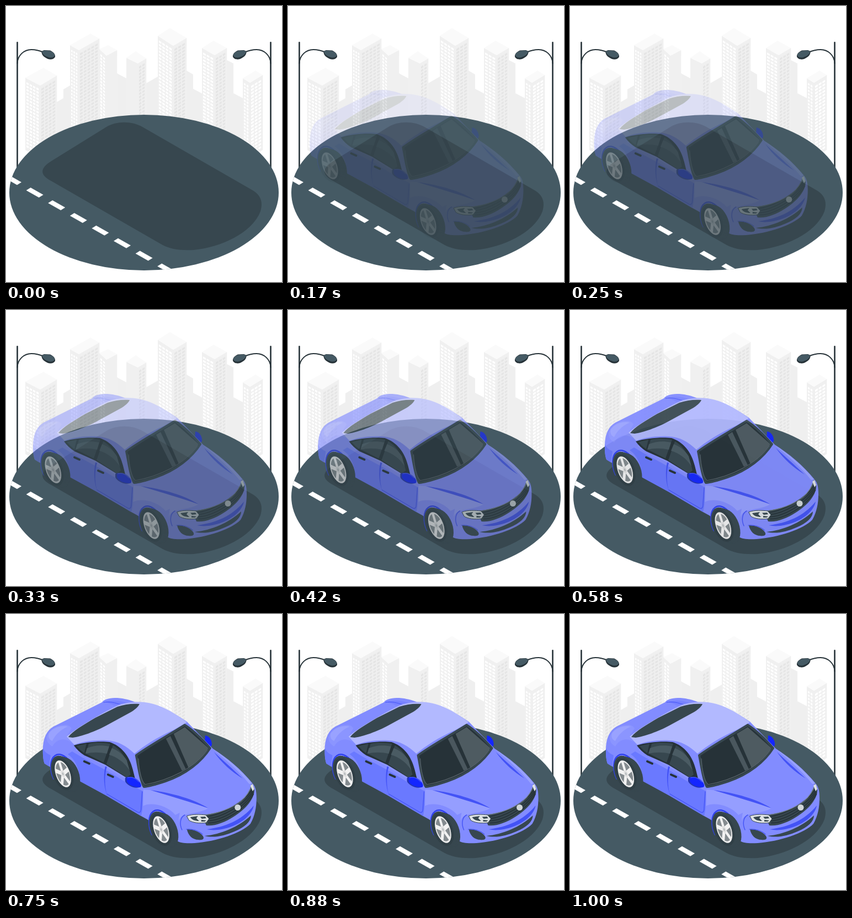
An HTML page with a canvas that plays this animation: 500 by 500 pixels, repeating every 1040 ms.

```html
<!DOCTYPE html>
<html lang="en">
<head>
<meta charset="utf-8">
<title>Car arriving</title>
<style>
html, body { margin: 0; width: 100%; height: 100%; overflow: hidden; background: #fff; }
canvas { display: block; width: 500px; height: 500px; }
</style>
</head>
<body>
<canvas id="stage"></canvas>
<script>
const SIZE = 500, LOOP = 1040, FPS = 24;
const INK = '#263238', SLATE = '#37474f', ROAD = '#455a64';
const BODY = '#828cff', SIDE = '#6a79ff', LIGHT = '#99a2ff', ROOF = '#b2b9ff', SEAM = '#4353f6', BLUE = '#1426ff';
const dpr = window.devicePixelRatio || 1;

function surface(canvas) {
  canvas.width = canvas.height = SIZE * dpr;
  const c = canvas.getContext('2d');
  c.scale(dpr, dpr);
  return c;
}
const stageCanvas = document.getElementById('stage');
const sceneCanvas = document.createElement('canvas');
const carCanvas = document.createElement('canvas');
const stage = surface(stageCanvas), scene = surface(sceneCanvas), car = surface(carCanvas);

function fill(c, d, color) {
  c.fillStyle = color;
  c.fill(new Path2D(d));
}
function line(c, d, color, width) {
  c.strokeStyle = color;
  c.lineWidth = width;
  c.lineCap = c.lineJoin = 'round';
  c.stroke(new Path2D(d));
}

// ---- scenery ----

// One wall of a tower: skewed so that its top edge runs from (x0,y0) to (x1,y1).
function wall(x0, y0, x1, y1, cols, glass) {
  const w = x1 - x0, pitch = cols ? (w - 3) / cols : 0, h = 275 - Math.max(y0, y1);
  scene.save();
  scene.transform(1, (y1 - y0) / w, 0, 1, x0, y0);
  scene.fillStyle = '#f0f0f0';
  scene.fillRect(0, 0, w + 0.3, h);
  scene.fillStyle = glass;
  for (let i = 0; i < cols; i++) {
    for (let y = 7; y < h - 4; y += 6) scene.fillRect(2 + i * pitch, y, pitch - 1.8, 3.6);
  }
  scene.restore();
}

function tower([lx, ly, bx, by, rx, ry, fx, fy], leftCols, rightCols, rightGlass = '#e5e5e5') {
  wall(lx, ly, fx, fy, leftCols, '#fff');
  wall(fx, fy, rx, ry, rightCols, rightGlass);
  fill(scene, `M${lx},${ly}L${bx},${by}L${rx},${ry}L${fx},${fy}Z`, '#fafafa');
}

function lamp() {
  line(scene, 'M20.5,66V294', INK, 2.6);
  line(scene, 'M20.5,104C21,89 33,79 46,79C55,79 61,81 68,84', INK, 2);
  fill(scene, 'M64.5,82L69,80L80,80.5C87,84 89.5,88 89,92C87,97 79,98 74,95C68,92 64,88 64.5,82Z', INK);
  fill(scene, 'M65.5,82L70,80.5L80,81.5C86,84 88.5,87 88,90C86,94 80,94.5 75,92C69,90 65,86 65.5,82Z', ROAD);
}

function drawScene() {
  scene.fillStyle = '#fff';
  scene.fillRect(0, 0, SIZE, SIZE);
  fill(scene, 'M92,174L104,167V151L116,144V270H92ZM201,122L218,131V230H201ZM254,140L275,128V230H254Z'
    + 'M327,117L339,124V150L356,159V240H327ZM400,98L412,104V158L429,167V270H400Z', '#efefef');
  tower([169, 78, 185, 71, 201, 80, 182, 90], 2, 0);
  tower([35, 130, 68, 112, 92, 126, 62, 144], 4, 4);
  tower([116, 71, 153, 50, 169, 59, 132, 80], 3, 5);
  tower([218, 94, 235, 82, 254, 95, 239, 104], 0, 2);
  tower([275, 54, 297, 40, 327, 58, 303, 72], 4, 3);
  tower([355, 76, 376, 63, 400, 76, 378, 89], 3, 3);
  tower([429, 131, 452, 117, 465, 125, 442, 139], 2, 3, '#fff');
  lamp();
  scene.save();
  scene.translate(SIZE, 0);
  scene.scale(-1, 1);
  lamp();
  scene.restore();

  // road disc, dashes and shadow
  scene.save();
  scene.beginPath();
  scene.ellipse(250, 338, 244, 141, 0, 0, 7);
  scene.fillStyle = ROAD;
  scene.fill();
  scene.clip();
  for (let i = 0; i < 8; i++) {
    const x = 5 + 39.6 * i, y = 306.2 + 22.9 * i;
    fill(scene, `M${x},${y}l23,13l-8,5l-23,-13Z`, '#fff');
  }
  scene.restore();
  fill(scene, 'M182,219C200,208 228,208 247,219L447,334C462,343 466,356 461,372C446,411 390,437 340,442'
    + 'C315,443 298,441 282,432L82,317C61,306 61,294 82,281Z', SLATE);
}

// ---- car ----

function disc(c, r, color) {
  c.beginPath();
  c.arc(0, 0, r, 0, 7);
  c.fillStyle = color;
  c.fill();
}

function wheel(x, y) {
  const tilt = -20 * Math.PI / 180;
  car.beginPath();
  car.ellipse(x + 1, y - 0.5, 20, 34, tilt, Math.PI * 0.95, Math.PI * 1.85);
  car.strokeStyle = '#2f41f0';
  car.lineWidth = 2.6;
  car.stroke();
  car.fillStyle = SLATE;
  for (let k = 11; k >= 0; k--) {
    car.beginPath();
    car.ellipse(x + k, y + 0.5 + k * 0.3, 19, 32.5, tilt, 0, 7);
    car.fill();
  }
  car.save();
  car.translate(x + 0.8, y + 2);
  car.rotate(tilt);
  car.save();
  car.scale(17.5, 30.5);
  disc(car, 1, '#303f46');
  car.restore();
  car.scale(12.8, 25.5);
  disc(car, 1, '#ededed');
  disc(car, 0.87, '#848b8f');
  car.strokeStyle = '#f2f2f2';
  car.lineCap = 'butt';
  car.lineWidth = 0.32;
  for (let i = 0; i < 5; i++) {
    const a = -1.45 + i * Math.PI * 0.4;
    car.beginPath();
    car.moveTo(0, 0);
    car.lineTo(Math.cos(a) * 0.92, Math.sin(a) * 0.92);
    car.stroke();
  }
  disc(car, 0.25, '#e0e0e0');
  disc(car, 0.1, '#b5babc');
  car.restore();
}

function drawBody() {
  fill(car, 'M359,220C367,221 372,230 371,238L366,243L358,236Z', BLUE);
  fill(car, 'M65,246C65,225 72,211 84,204L172,160C177,153 188,152 200,152C213,153 223,156 232,159.5'
    + 'C262,159 292,172 326,195L373,244C398,260 424,281 445,307C451,314 452,322 452,334C452,350 449,366 441,380'
    + 'C425,397 380,412 340,415C325,416 314,415 308,411L254,372L243,366L180,329L133,303L78,277L68,271C65,263 65,254 65,246Z', BODY);

  // tail and rear fenders
  fill(car, 'M176,160C184,156 200,156 213,160L222,163C210,164 200,165 194,166C188,162 182,161 176,160Z', '#7782ff');
  line(car, 'M175,160C186,158 196,161 206,164', SEAM, 1);
  fill(car, 'M72,222C78,208 92,200 108,201C112,202 115,204 117,207L108,222L116,232C104,224 90,226 82,240C76,236 71,231 72,222Z', '#8b95ff');
  fill(car, 'M76,216C84,205 100,201 110,204C98,209 88,218 82,230C76,228 74,222 76,216Z', LIGHT);
  fill(car, 'M65,243C68,250 73,253 79,256L76,276L68,271C65,262 65,252 65,243Z', SIDE);

  // flank
  fill(car, 'M118,249L140,262L181,284L214,304L246,321C247,340 246,355 243,366L180,329L132,303C132,285 126,265 110,254Z', SIDE);
  line(car, 'M126,246L180,276L222,302', '#8d96ff', 3);
  fill(car, 'M181,277C177,290 176,310 181,327C176,314 174,294 178,276Z', SEAM);
  line(car, 'M181,326L237,359C242,361 243,357 243,350L245,322', SEAM, 1.3);

  // front fender
  fill(car, 'M247,318C285,320 330,333 365,352C350,360 335,360 322,364C313,367 309,374 308,388C300,365 282,354 262,356L246,364Z', '#959eff');
  fill(car, 'M246,348C260,340 290,346 305,364L313,360L308,389C298,365 280,352 258,358L246,366Z', BODY);

  // cabin
  fill(car, 'M108,222C124,208 170,180 204,164C218,160 232,159 245,159.5C272,161 298,175 326,196L302,210C270,224 248,239 231,253'
    + 'C216,239 202,230 180,229C155,228 137,231 122,237Z', ROOF);
  fill(car, 'M111,223C119,212 138,201 160,188L200,168C214,163 228,162 240,163C238,168 231,174 224,178L180,202C160,213 134,222 119,224Z', SLATE);
  fill(car, 'M121,238C140,232 168,230 186,232C207,239 222,257 228,282L233,302C226,301 220,298 214,295L178,273L140,256C132,251 126,245 121,238Z', INK);
  fill(car, 'M126,239L144,235L140,252C134,248 130,244 126,239Z', SLATE);
  fill(car, 'M148,235C162,232 176,233 187,235L175,269L143,253Z', SLATE);
  fill(car, 'M192,238C207,246 218,263 224,291L217,296L180,272Z', SLATE);
  fill(car, 'M145,243C157,238 171,237 185,240L181,253C167,250 155,250 142,253ZM190,243C201,247 211,255 217,265L222,283C212,268 199,259 185,255Z', '#4a5b63');

  // windscreen
  const screen = 'M234,256C260,237 292,220 322,201C338,211 354,227 368,243C353,267 324,291 287,303C272,308 260,312 248,313C241,302 238,275 234,256Z';
  fill(car, screen, INK);
  fill(car, 'M302,217L322,205L365,243C356,257 344,269 329,279Z', '#4e5b61');
  fill(car, 'M288,226L296,221L324,281L317,284Z', '#4a575e');
  line(car, screen, SLATE, 4);
  line(car, 'M238,262C239,280 242,300 250,309C291,302 340,280 363,246', '#566168', 1.2);

  // bonnet creases
  fill(car, 'M260,319C300,324 340,336 365,352C337,342 299,331 260,319Z', SEAM);
  fill(car, 'M375,250C392,266 408,280 427,298C407,286 389,270 375,250Z', SEAM);
  fill(car, 'M373,245C398,260 425,283 444,307L439,308C420,284 397,264 373,245Z', LIGHT);

  // handles and near mirror
  line(car, 'M140,267L149,271M183,291L192,295', INK, 4);
  fill(car, 'M214,297C218,293 225,295 228,299L240,314C230,317 217,310 214,303Z', '#2435b0');
  fill(car, 'M217,297C225,293 235,297 240,304C244,309 244,313 241,314C230,314 220,310 217,303Z', BLUE);
  line(car, 'M219,296.5C226,294 234,298 239,304', SEAM, 1.6);
}

function drawNose() {
  line(car, 'M322,364C314,368 312,380 317,391', SEAM, 1.4);
  fill(car, 'M357,364C383,361 407,352 424,339C435,330 441,318 444,307L448,316C450,334 432,354 411,367C394,378 375,385 361,383L358,376Z', SLATE);
  for (let k = 0; k < 4; k++) {
    const y = k * 4.8;
    line(car, `M${362 + k},${367 + y * 0.8}C${388 + k},${364 + y} ${431},${341 + y} ${445 + k * 0.5},${316 + y * 0.7}`, INK, 1.8);
  }
  line(car, 'M358,364C383,361 407,352 424,339C435,330 441,318 444,308', '#6f7d84', 1.2);
  car.save();
  car.translate(418, 350.5);
  disc(car, 5.5, '#cfd5d7');
  car.restore();

  // lights
  fill(car, 'M326,366C337,362 350,363 360,364L366,371L361,378C349,380 336,378 330,374Z', '#dfe3e5');
  line(car, 'M326,366C337,362 350,363 360,364L366,371L361,378C349,380 336,378 330,374Z', SLATE, 1);
  fill(car, 'M332,368L346,366L343,370L348,375C341,375 335,373 332,368ZM350,367.5L359,367L361,370L353,371ZM352,373L361,374L358,376L352,376Z', SLATE);
  fill(car, 'M441,311L445,308L448,317L445,321Z', '#dfe3e5');

  // bumper
  fill(car, 'M362,390C395,386 425,374 447,347C444,363 428,377 407,385C391,391 374,393 362,390Z', SEAM);
  fill(car, 'M358,402C388,399 419,386 442,365C442,376 431,386 412,394C394,402 375,406 358,402Z', SLATE);
  fill(car, 'M326,390C338,390 348,394 354,401C359,407 355,410 347,409C336,409 328,401 326,390Z', SLATE);
  line(car, 'M325,390C335,389 347,392 354,399', SEAM, 1.2);
}

function drawCar(dx) {
  car.clearRect(0, 0, SIZE, SIZE);
  car.save();
  car.translate(dx, 0);
  drawBody();
  drawNose();
  wheel(100.5, 287.5);
  wheel(278.5, 388.5);
  car.restore();
}

// ---- motion ----

function ease(x) {
  const curve = (a, b, s) => 3 * (1 - s) * (1 - s) * s * a + 3 * (1 - s) * s * s * b + s * s * s;
  if (x >= 1) return 1;
  let lo = 0, hi = 1;
  for (let i = 0; i < 30; i++) {
    const mid = (lo + hi) / 2;
    if (curve(0.36, 0.5, mid) < x) lo = mid; else hi = mid;
  }
  return curve(-0.01, 1.38, lo);
}

let shown = -1;
function render(now) {
  const step = Math.floor(((now % LOOP) + 4) * FPS / 1000);
  if (step !== shown) {
    shown = step;
    const k = step ? ease(step / FPS + 0.035) : 0;
    stage.globalAlpha = 1;
    stage.drawImage(sceneCanvas, 0, 0, SIZE, SIZE);
    drawCar(-30 * (1 - k));
    stage.globalAlpha = Math.max(0, Math.min(1, k));
    stage.drawImage(carCanvas, 0, 0, SIZE, SIZE);
  }
}

drawScene();
const start = performance.now();
function tick() {
  render(Math.max(0, performance.now() - start));
  requestAnimationFrame(tick);
}
tick();
</script>
</body>
</html>
```
